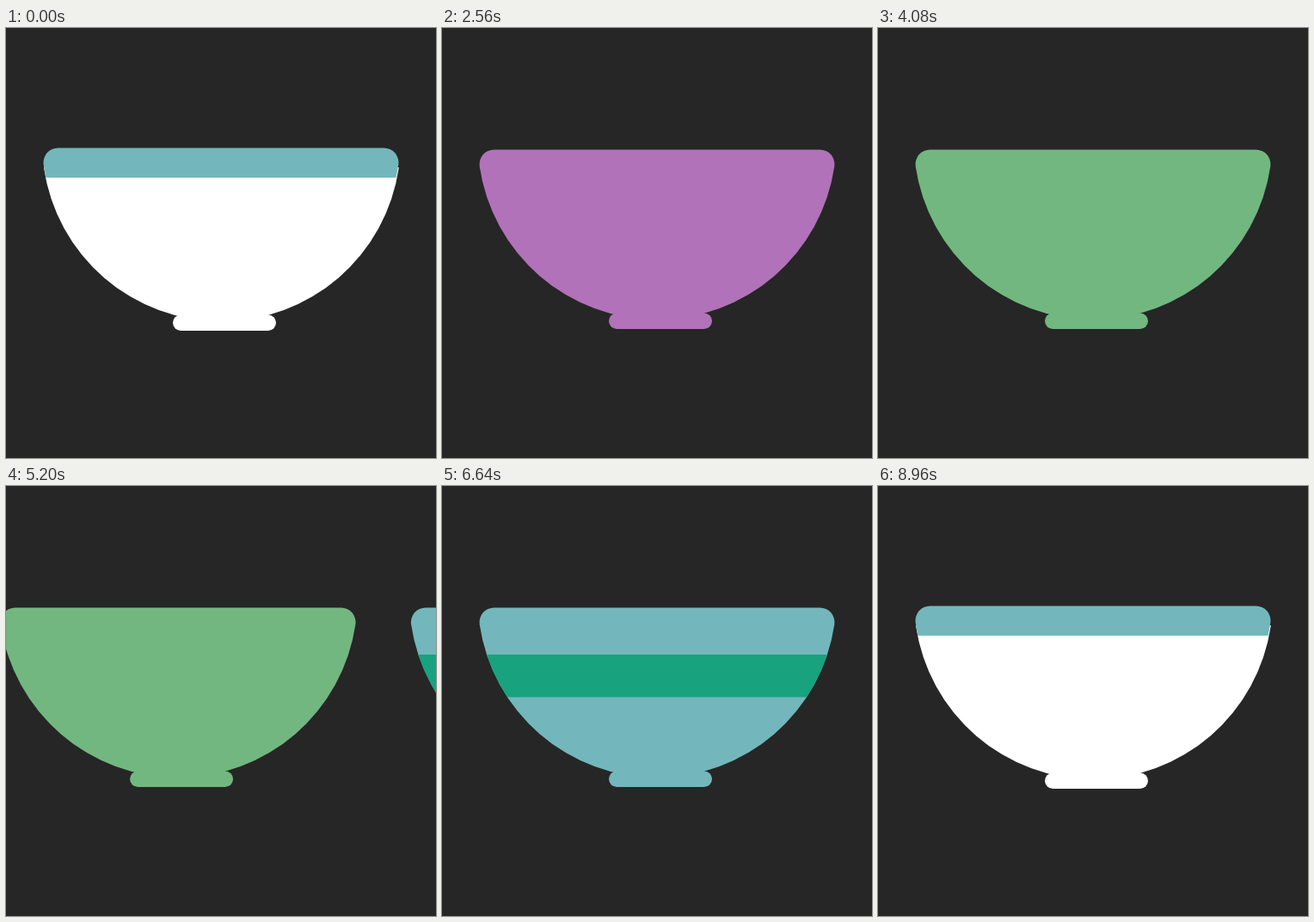
An HTML page for the animation above (9000 ms loop, 500 px wide and 500 px high).

```html
<!DOCTYPE html>
<html lang="en">
<head>
<meta charset="utf-8">
<title>Bowls</title>
<style>
  html, body { margin: 0; width: 100%; height: 100%; overflow: hidden; background: #262626; }
  svg { display: block; width: 100%; height: 100%; }
</style>
</head>
<body>
<svg viewBox="0 0 500 500">
  <defs>
    <path id="body" d="M60.5 141.5H439.5A17 17 0 0 1 456.3 160.9A208.5 208.5 0 0 1 43.7 160.9A17 17 0 0 1 60.5 141.5Z"/>
    <rect id="foot" x="194" y="331.5" width="120" height="18.5" rx="9.25"/>
    <clipPath id="inside"><use href="#body"/></clipPath>
    <clipPath id="rim"><rect y="130" width="500" height="44"/></clipPath>
    <clipPath id="belowRim"><rect y="162" width="500" height="200"/></clipPath>
  </defs>
  <rect width="500" height="500" fill="#262626"/>
  <g id="white">
    <g fill="#fff">
      <g clip-path="url(#belowRim)"><use href="#body" x="0.4" y="2"/></g>
      <use href="#foot" y="2"/>
    </g>
    <g clip-path="url(#rim)" fill="#73b7bc"><use href="#body" y="-2"/></g>
  </g>
  <g id="purple" fill="#b172b9"><use href="#body"/><use href="#foot"/></g>
  <g id="green" fill="#73b780"><use href="#body"/><use href="#foot"/></g>
  <g id="blue" fill="#73b7bc">
    <use href="#body"/><use href="#foot"/>
    <rect y="196" width="500" height="49.5" fill="#18a27e" clip-path="url(#inside)"/>
  </g>
</svg>
<script>
const LOOP = 9000, SLIDE = 1000, STEP = 40;

// Each slide sends one bowl out to the left and brings the next in from the right.
const slides = [
  { start: 1000, out: 'white',  outBy: 500, into: 'purple', inBy: 474.5 },
  { start: 3000, out: 'purple', outBy: 466, into: 'green',  inBy: 474 },
  { start: 5000, out: 'green',  outBy: 480, into: 'blue',   inBy: 477 },
  { start: 7000, out: 'blue',   outBy: 502, into: 'white',  inBy: 472 }
];
const bowls = Object.fromEntries(
  ['white', 'purple', 'green', 'blue'].map(id => [id, document.getElementById(id)]));

const ease = s => s * s * (3 - 2 * s);

function draw(time) {
  const x = { white: 0 };
  for (const { start, out, outBy, into, inBy } of slides) {
    if (time < start) break;
    const p = ease(Math.min(1, (time - start) / SLIDE));
    if (p < 1) x[out] = -outBy * p;
    else delete x[out];
    x[into] = inBy * (1 - p);
  }
  for (const [id, bowl] of Object.entries(bowls)) {
    bowl.style.display = id in x ? '' : 'none';
    if (id in x) bowl.setAttribute('transform', `translate(${x[id].toFixed(2)} 0)`);
  }
}

const begin = performance.now();
function tick() {
  const time = (performance.now() - begin) % LOOP;
  draw(Math.floor(time / STEP) * STEP);
  requestAnimationFrame(tick);
}
draw(0);
requestAnimationFrame(tick);
</script>
</body>
</html>
```
